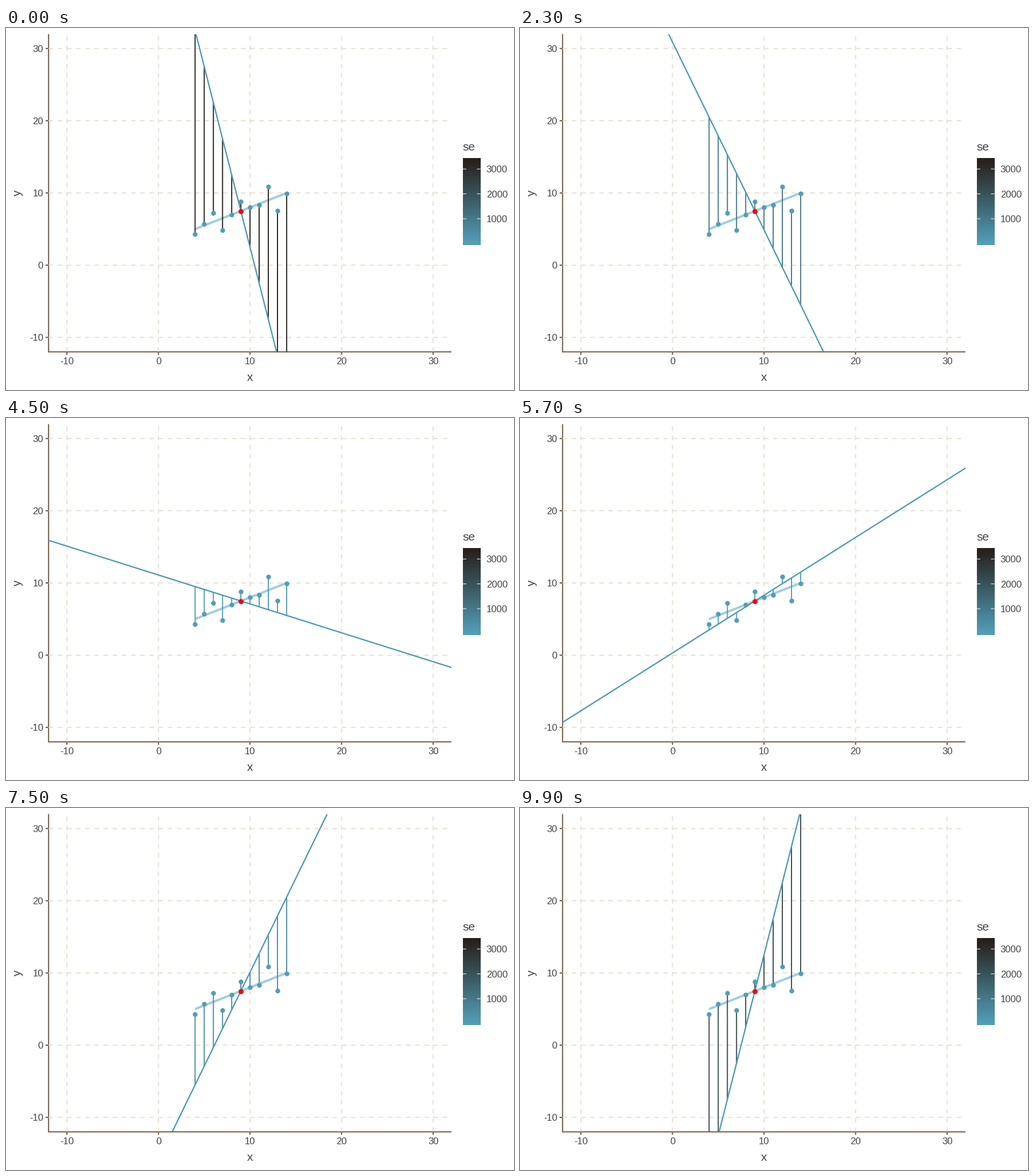
A matplotlib script that plays this animation: 885x632 px, repeating every 10000 ms.

```python
import numpy as np
import matplotlib.pyplot as plt
from matplotlib.animation import FuncAnimation
from matplotlib.collections import LineCollection
from matplotlib.colors import LinearSegmentedColormap, Normalize

W, H = 885, 632
FRAMES, INTERVAL = 100, 100
LEFT, RIGHT, TOP, BOTTOM = 74.2, 776, 10.6, 565.4
LO, HI = -12, 32

BLUE, DARK, LIGHT = "#529db7", "#28211b", "#a0cee1"
GRID, AXIS, INK = "#e9dfd0", "#6f5b45", "#444444"

plt.rcParams["font.family"] = "Liberation Sans"
plt.rcParams["path.snap"] = False

x = np.arange(4, 15)
y = np.array([4.26, 5.68, 7.24, 4.82, 6.95, 8.81, 8.04, 8.33, 10.84, 7.58, 9.96])
CX, CY = 9, 7.5


def predict(slope, at):
    return CY + slope * (at - CX)


def sq_error(slope):
    return np.sum((y - predict(slope, x)) ** 2)


slopes = np.linspace(-5, 5, 51)
errors = np.array([sq_error(s) for s in slopes])
cmap = LinearSegmentedColormap.from_list("se", [BLUE, DARK])
norm = Normalize(errors.min(), errors.max())

# At 72 dpi one point equals one pixel.
fig = plt.figure(figsize=(W / 72, H / 72), dpi=72, facecolor="white")

page = fig.add_axes([0, 0, 1, 1])
page.set(xlim=(0, W), ylim=(H, 0))
page.axis("off")

panel = fig.add_axes([LEFT / W, 1 - BOTTOM / H, (RIGHT - LEFT) / W, (BOTTOM - TOP) / H])
panel.set(xlim=(LO, HI), ylim=(LO, HI))
panel.axis("off")


def px(v):
    return LEFT + (v - LO) / (HI - LO) * (RIGHT - LEFT)


def py(v):
    return BOTTOM - (v - LO) / (HI - LO) * (BOTTOM - TOP)


def stroke(x0, y0, x1, y1, color=AXIS, lw=2, cap="butt"):
    page.plot([x0, x1], [y0, y1], color=color, lw=lw, solid_capstyle=cap)


def label(lx, ly, text, size=16.6, **kw):
    page.text(lx, ly, text, size=size, color=INK, va="baseline", **kw)


# Axes and grid
stroke(LEFT, BOTTOM, LEFT, TOP)
stroke(LEFT - 1, BOTTOM, RIGHT, BOTTOM)
for v in (-10, 0, 10, 20, 30):
    dash = dict(color=GRID, lw=1.9, dashes=(4.2, 4.2), dash_capstyle="butt", zorder=1)
    panel.plot([LO, HI], [v, v], **dash)
    stroke(LEFT - 5.2, py(v), LEFT, py(v))
    label(64.8, py(v) + 6, str(v), ha="right")
    if v != 20:
        pass
    panel.plot([v, v], [LO, HI], **dash)
    stroke(px(v), BOTTOM, px(v), BOTTOM + 5.2)
    label(px(v), 587, str(v), ha="center")
label(425, 616.5, "x", 20.75, ha="center")
label(25.5, 288, "y", 20.75, ha="center", rotation=90, rotation_mode="anchor")

# Colour bar
BX0, BX1, BY0, BY1 = 796, 826.5, 227, 379
label(795.8, 214.5, "se", 20.75)
ramp = np.clip(np.linspace(1.026, -0.026, 152), 0, 1)[:, None]
page.imshow(ramp, cmap=cmap, vmin=0, vmax=1, extent=(BX0, BX1, BY1, BY0),
            aspect="auto", interpolation="nearest")
page.set(xlim=(0, W), ylim=(H, 0))
for v in (1000, 2000, 3000):
    ty = 333 - (v - 1000) * 0.0434
    stroke(BX0, ty, BX0 + 6, ty, "white", 1)
    stroke(BX1 - 6, ty, BX1, ty, "white", 1)
    label(836.8, ty + 6, str(v))

# Data
ends = np.array([4, 14])
panel.plot(ends, predict(0.5, ends), color=LIGHT, lw=4, solid_capstyle="butt", zorder=2)
residuals = panel.add_collection(LineCollection([], linewidths=1.9, zorder=3), autolim=False)
trial, = panel.plot([], [], color="#4d9ab4", lw=2.3, zorder=4)
panel.plot(x, y, "o", color=BLUE, ms=8.3, mew=0, zorder=5)
panel.plot(CX, CY, "o", color="red", ms=8.9, mew=0, zorder=6)

span = np.array([LO - 8, HI + 8])


def draw(frame):
    k = (frame + 1) // 2
    fit = predict(slopes[k], x)
    residuals.set_segments([[(a, b), (a, c)] for a, b, c in zip(x, y, fit)])
    residuals.set_color(cmap(norm(errors[k])))
    trial.set_data(span, predict(slopes[k], span))
    return residuals, trial


anim = FuncAnimation(fig, draw, frames=FRAMES, interval=INTERVAL,
                     init_func=lambda: draw(0), repeat=True, repeat_delay=0)
plt.show()
```
